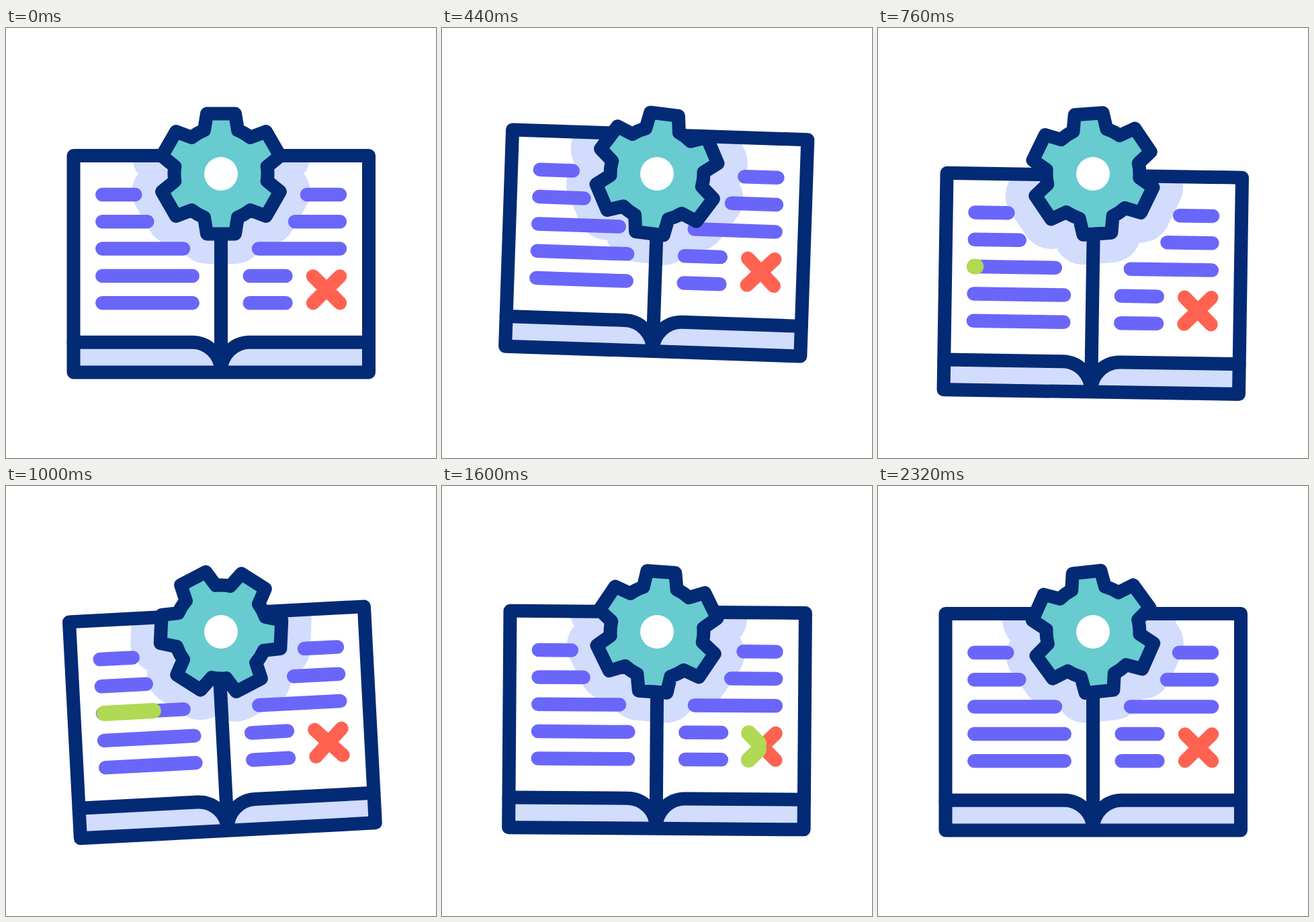
Write an HTML page that moves like this. It is 640x640 px and loops after 2.36 s.

```html
<!DOCTYPE html>
<html lang="en">
<head>
<meta charset="utf-8">
<title>Book and gear</title>
<style>
  html, body { margin: 0; width: 100%; height: 100%; overflow: hidden; background: #fff; }
  svg { display: block; width: 100%; height: 100%; }
  path, rect { fill: none; stroke-width: 20; stroke-linecap: round; stroke-linejoin: round; }
  .navy { stroke: #032a75; }
  .text { stroke: #6a66fa; stroke-width: 20.5; }
  .cross { stroke: #ff6250; stroke-width: 20.5; }
  .mark { stroke: #b0d954; stroke-width: 23; }
</style>
</head>
<body>
<svg viewBox="0 0 640 640">
  <clipPath id="page"><rect id="pageArea" x="100.5" y="190" width="439.5" height="322.4"/></clipPath>
  <g clip-path="url(#page)">
    <path id="halo" style="fill:#d2dcfd;stroke:#d2dcfd;stroke-width:89"/>
  </g>
  <g id="book">
    <rect x="105" y="470" width="430" height="40" style="fill:#d2dcfd"/>
    <path class="navy" style="fill:#032a75;stroke:none" d="M310 469.2V505H330V469.2Z"/>
    <path class="navy" d="M320 217V508M100.5 467.7H277A43 43 0 0 1 320 510.7A43 43 0 0 1 363 467.7H540"/>
    <rect class="navy" x="100.5" y="190" width="439.5" height="322.4"/>
    <path class="text" d="M143.3 248H192.3M143.3 288.3H210.3M143.3 328.6H264M143.3 369H277.7M143.3 409.3H277.7
      M448 248H497M430 288.3H497M376 328.6H497M362.7 369H416.5M362.7 409.3H416.5"/>
    <path class="cross" d="M457 369.4L497 409.2M457 409.2L497 369.4"/>
    <path class="mark" id="lineMark"/>
    <path class="mark" id="crossMark"/>
  </g>
  <path id="gear" class="navy" style="fill:#67cbd0"/>
  <circle cx="320" cy="217" r="25" fill="#fff"/>
</svg>
<script>
const LOOP = 2360, STEP = 40;
const $ = id => document.getElementById(id);

// [time, value] keys with eased movement between them
const TILT = [[200, 0], [600, 3], [1000, -3], [1360, 2], [1700, 0]];
const LIFT = [[200, 0], [400, -33], [800, 31], [1000, 0.7], [1360, -12.6], [1700, 0]];

function ease(t, start, end) {
  const p = Math.min(1, Math.max(0, (t - start) / (end - start)));
  return p * p * (3 - 2 * p);
}

function follow(keys, t) {
  let value = keys[0][1];
  for (let i = 1; i < keys.length; i++) {
    value += (keys[i][1] - keys[i - 1][1]) * ease(t, keys[i - 1][0], keys[i][0]);
  }
  return value;
}

// Six tapered teeth joined by arcs, centred on the origin
function gearPath() {
  const root = 69.5, rootHalf = 25, tip = 89.4, tipHalf = 21;
  const rootY = Math.sqrt(root ** 2 - rootHalf ** 2);
  let d = "";
  for (let i = 0; i < 6; i++) {
    const a = i * Math.PI / 3, c = Math.cos(a), s = Math.sin(a);
    const at = (x, y) => `${x * c - y * s} ${x * s + y * c}`;
    d += (i ? `A${root} ${root} 0 0 1 ` : "M") + at(-rootHalf, -rootY) +
      `L${at(-tipHalf, -tip)}L${at(tipHalf, -tip)}L${at(rootHalf, -rootY)}`;
  }
  return d + `A${root} ${root} 0 0 1 ${-rootHalf} ${-rootY}Z`;
}

// The part of a straight stroke between two fractions of its length
function segment(x1, y1, x2, y2, from, to) {
  if (to <= 0 || from >= 1) return "";
  const at = p => `${x1 + (x2 - x1) * p} ${y1 + (y2 - y1) * p}`;
  return `M${at(from)}L${at(to)}`;
}

function draw(t) {
  const move = `translate(0 ${follow(LIFT, t)}) rotate(${follow(TILT, t)} 320 320)`;
  $("book").setAttribute("transform", move);
  $("pageArea").setAttribute("transform", move);

  const spin = `translate(320 217) rotate(${360 * t / LOOP})`;
  $("gear").setAttribute("transform", spin);
  $("halo").setAttribute("transform", spin);

  $("lineMark").setAttribute("d",
    segment(143.5, 328.6, 264, 328.6, ease(t, 960, 1480), ease(t, 720, 1200)));
  const from = ease(t, 1640, 2120), to = ease(t, 1400, 1880);
  $("crossMark").setAttribute("d",
    segment(457, 369.4, 497, 409.2, from, to) + segment(457, 409.2, 497, 369.4, from, to));
}

function tick(now) {
  draw(Math.floor(now % LOOP / STEP) * STEP);
  requestAnimationFrame(tick);
}

$("gear").setAttribute("d", gearPath());
$("halo").setAttribute("d", gearPath());
draw(0);
requestAnimationFrame(tick);
</script>
</body>
</html>
```
